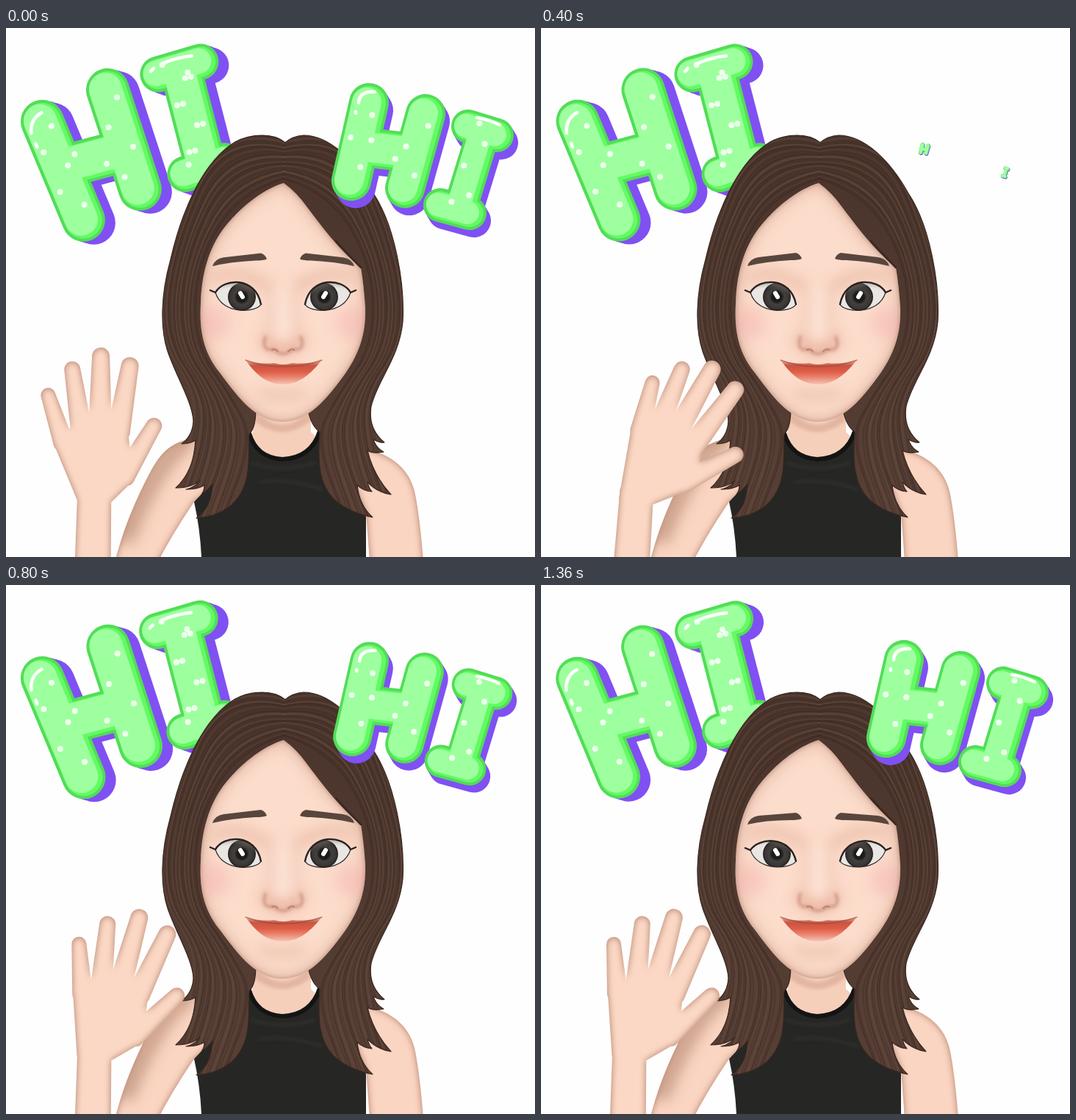
An HTML page that plays this animation: 720 by 720 pixels, repeating every 1440 ms.

```html
<!DOCTYPE html>
<html lang="en">
<head>
<meta charset="utf-8">
<title>Waving hello</title>
<style>
  html, body { margin: 0; height: 100%; overflow: hidden; background: #fefefe; }
  svg { display: block; width: 100vw; height: 100vh; }
</style>
</head>
<body>
<svg viewBox="0 0 720 720" fill="none" stroke-linecap="round" stroke-linejoin="round">
  <defs>
    <filter id="round" color-interpolation-filters="sRGB">
      <feGaussianBlur in="SourceAlpha" stdDeviation="5" result="b"/>
      <feFlood flood-color="#a06a55" flood-opacity=".85"/>
      <feComposite operator="out" in2="b"/>
      <feComposite operator="atop" in2="SourceGraphic"/>
    </filter>
    <filter id="faceRound" color-interpolation-filters="sRGB">
      <feGaussianBlur in="SourceAlpha" stdDeviation="11" result="b"/>
      <feFlood flood-color="#c48b75" flood-opacity=".65"/>
      <feComposite operator="out" in2="b"/>
      <feComposite operator="atop" in2="SourceGraphic"/>
    </filter>
    <filter id="blur2" x="-50%" y="-50%" width="200%" height="200%"><feGaussianBlur stdDeviation="2"/></filter>
    <filter id="blur9" x="-80%" y="-80%" width="260%" height="260%"><feGaussianBlur stdDeviation="9"/></filter>
    <linearGradient id="lips" x2="0" y2="1">
      <stop stop-color="#f0b7a4"/><stop offset=".22" stop-color="#c65643"/>
      <stop offset=".48" stop-color="#e05c45"/><stop offset=".72" stop-color="#e98773"/>
      <stop offset="1" stop-color="#f6c4b2"/>
    </linearGradient>
    <linearGradient id="hairTone" x2="0" y2="1">
      <stop stop-color="#49342b"/><stop offset="1" stop-color="#573f35"/>
    </linearGradient>
    <radialGradient id="iris">
      <stop offset=".35" stop-color="#1d1b1a"/><stop offset=".55" stop-color="#44403d"/>
      <stop offset=".85" stop-color="#393634"/><stop offset="1" stop-color="#1f1d1c"/>
    </radialGradient>
    <clipPath id="hairClip"><use href="#hair"/></clipPath>
    <clipPath id="faceClip"><use href="#face"/></clipPath>
    <clipPath id="armClip"><use href="#upperArm"/></clipPath>
    <clipPath id="eyeClip"><path id="eyeShape"/></clipPath>
    <path id="upperArm" d="M262 557C225 563 212 575 195 607C175 645 156 690 145 740H200Q222 695 256 645L300 610Z"/>
    <path id="hair" d="M380 156C365 143 335 143 312 155C270 180 240 245 224 315C210 365 210 410 220 440C232 475 254 510 255 535Q254 555 239 566Q250 566 258 561C256 590 248 610 231 626Q252 626 264 616Q256 626 245 628Q262 628 270 622Q270 630 266 635Q276 628 281 620C280 645 272 658 259 667C290 665 320 650 328 610C332 590 330 570 331 553C338 545 340 535 340 515V480H411V520C414 535 420 545 427 550C424 590 426 620 445 640C460 655 480 662 499 666C488 656 480 642 478 622Q486 630 498 631Q494 627 492 618Q505 632 524 635C510 620 498 600 492 575Q500 580 514 577Q504 572 500 560Q508 565 515 564C500 552 494 535 497 515C505 480 535 450 540 400C543 350 530 270 500 225C475 180 440 146 405 146Q390 147 380 156Z"/>
    <path id="face" d="M378 211C348 220 318 245 296 273C276 300 266 335 265 375C263 410 268 440 290 468C312 497 338 536 376 536C414 536 440 500 462 470C484 438 490 410 489 380Q487 350 483 326C455 304 428 268 410 244Q396 224 378 211Z"/>
    <g id="eye">
      <g clip-path="url(#eyeClip)">
        <path d="M280 335H350V392H280Z" fill="#e9e6e3"/>
        <circle cx="321" cy="366" r="19" fill="url(#iris)"/>
        <path d="M319 361l3 5" stroke="#fff" stroke-width="6"/>
        <path d="M284 352Q318 338 348 364" stroke="#8a7d77" stroke-width="6" opacity=".45" filter="url(#blur2)"/>
      </g>
      <path class="lower" stroke="#2b2524" stroke-width="1.2"/>
      <path class="lash" stroke="#2a2120" stroke-width="2.4"/>
    </g>
    <path id="brow" fill="#58463d"/>
  </defs>

  <g id="leftWord"></g>

  <g filter="url(#round)" fill="#fad5c1">
    <use href="#upperArm"/>
    <path d="M480 570C530 580 553 605 558 640Q565 680 569 740H496L490 660L470 610Z"/>
  </g>
  <g clip-path="url(#armClip)">
    <path d="M245 562Q205 590 165 690" stroke="#b98d77" stroke-width="24" opacity=".7" filter="url(#blur9)"/>
  </g>
  <path d="M336 490H415V550Q440 570 430 600H325Q315 570 336 550Z" fill="#f6cfbb"/>
  <path d="M338 518Q376 562 414 518V535Q376 565 338 535Z" fill="#cf9c86" opacity=".5" filter="url(#blur2)"/>
  <path d="M331 552C338 572 352 584 376 586C402 585 419 572 427 549Q445 565 462 600Q466 640 490 665V720H266Q264 680 256 645Q300 600 310 570Z" fill="#262724"/>
  <path d="M331 552C338 574 352 585 376 587C402 586 419 574 427 549" stroke="#131413" stroke-width="6"/>
  <path d="M335 592Q376 606 420 592M345 618Q385 612 430 628" stroke="#353632" stroke-width="4" opacity=".6" filter="url(#blur2)"/>

  <use href="#hair" fill="url(#hairTone)"/>
  <g id="strands" clip-path="url(#hairClip)"></g>
  <use href="#hair" stroke="#38261f" stroke-width="1.2"/>

  <use href="#face" fill="#fcdccb" filter="url(#faceRound)"/>
  <g clip-path="url(#faceClip)">
    <g filter="url(#blur9)">
      <ellipse cx="282" cy="402" rx="23" ry="22" fill="#f3a3a5" opacity=".35"/>
      <ellipse cx="472" cy="402" rx="23" ry="22" fill="#f3a3a5" opacity=".35"/>
      <path d="M285 340Q318 325 350 350M469 340Q436 325 404 350" stroke="#dda28b" stroke-width="12" opacity=".55"/>
      <path d="M352 425Q376 452 402 425" stroke="#dd987f" stroke-width="13" opacity=".7"/>
      <path d="M358 345Q368 385 356 418M396 345Q388 385 398 418" stroke="#e5b19b" stroke-width="8" opacity=".55"/>
      <path d="M348 496Q376 506 404 496" stroke="#dca48e" stroke-width="8" opacity=".7"/>
      <path d="M377 360V415" stroke="#ffebdf" stroke-width="9"/>
    </g>
    <use href="#face" stroke="#7e5646" stroke-width="2" opacity=".5" filter="url(#blur2)"/>
  </g>
  <path d="M353 420Q348 436 358 438Q365 436 369 441Q377 446 385 441Q390 436 397 438Q407 435 401 420" stroke="#bd806c" stroke-width="2.5" filter="url(#blur2)"/>
  <path d="M362 438q5-2 8 2M384 440q4-4 8-2" stroke="#a76654" stroke-width="2" opacity=".6"/>
  <path d="M326 452Q345 458 365 456Q377 460 390 456Q410 458 430 452C415 470 400 485 377 485C352 485 338 468 326 452Z" fill="url(#lips)"/>
  <path d="M326 452Q350 461 377 461Q405 461 430 452" stroke="#9c4435" stroke-width="1.4" opacity=".6"/>
  <use href="#eye"/><use href="#eye" transform="matrix(-1 0 0 1 754 0)"/>
  <use href="#brow"/><use href="#brow" transform="matrix(-1 0 0 1 755 0)"/>
  <path d="M449 290Q466 309 483 326" stroke="#3a2821" stroke-width="2.5"/>

  <g id="rightWord"></g>
  <g id="hand" filter="url(#round)" fill="#fbd8c5" stroke="#fbd8c5"></g>
</svg>

<script>
const LOOP = 1440, STEP = 80, TAU = 2 * Math.PI;
const $ = id => document.getElementById(id);
const mix = (a, b, t) => a + (b - a) * t;
const mixPoint = (a, b, t) => a.map((v, i) => mix(v, b[i], t));
const polar = ([x, y], degrees, length) => {
  const a = degrees * TAU / 360;
  return [x + length * Math.sin(a), y - length * Math.cos(a)];
};

// Bubble letter from thick bars, with dots zigzagging along each bar
function letter(word, { bars, width, shadow: [sx, sy], shine, center: [cx, cy] }) {
  const d = bars.map(([x1, y1, x2, y2]) => `M${x1} ${y1}L${x2} ${y2}`).join('');
  const layer = (color, w, x = 0, y = 0) =>
    `<path d="${d}" stroke="${color}" stroke-width="${w}" transform="translate(${x} ${y})"/>`;
  const dots = bars.map(([x1, y1, x2, y2]) => {
    const length = Math.hypot(x2 - x1, y2 - y1), count = Math.round(length / 32);
    return Array.from({ length: count }, (_, i) => {
      const t = (i + .4) / count, side = (i % 2 ? -.2 : .2) * width / length;
      return `<circle cx="${mix(x1, x2, t) + (y2 - y1) * side - 3}" cy="${mix(y1, y2, t) - (x2 - x1) * side}" r="4" fill="#efffee"/>`;
    }).join('');
  }).join('');
  const g = document.createElementNS('http://www.w3.org/2000/svg', 'g');
  g.innerHTML = layer('#8050f3', width, sx / 2, sy / 2) + layer('#8050f3', width, sx, sy) +
    layer('#53dc58', width) + layer('#62fb62', width - 8) + layer('#9eff9f', width - 14, -3, -1) +
    dots + `<path d="${shine}" stroke="#fff" stroke-width="4.5"/>`;
  word.append(g);
  return (scale, dx = 0, dy = 0) => g.setAttribute('transform',
    `translate(${cx + dx} ${cy + dy}) scale(${scale}) translate(${-cx} ${-cy})`);
}

const leftH = letter($('leftWord'), {
  bars: [[50, 127, 106, 261], [139, 84, 183, 219], [85, 187, 160, 167]],
  width: 59, shadow: [14, 4], center: [123, 174], shine: 'M35 143Q33 124 49 115M41 157l2 5'
});
const leftI = letter($('leftWord'), {
  bars: [[206, 63, 264, 46], [233, 58, 266, 186], [241, 56, 274, 184], [243, 199, 297, 181]],
  width: 49, shadow: [14, 5], center: [247, 122], shine: 'M213 48Q232 40 252 38M196 59l4-4'
});
const rightH = letter($('rightWord'), {
  bars: [[494, 102, 470, 208], [571, 117, 543, 218], [485, 162, 555, 170]],
  width: 54, shadow: [6, 10], center: [522, 165], shine: 'M480 102Q481 86 502 87M476 114v2'
});
const rightI = letter($('rightWord'), {
  bars: [[629, 134, 668, 146], [650, 141, 618, 246], [591, 241, 631, 252]],
  width: 46, shadow: [6, 10], center: [632, 197], shine: 'M641 122Q658 125 672 132'
});

// Hair strands blend from the outer edge to the inner edge, mirrored for the right side
const outerEdge = [[379, 156], [290, 130], [222, 300], [208, 420], [262, 500], [252, 570], [225, 650]];
const innerEdge = [[379, 208], [320, 230], [262, 320], [258, 430], [310, 505], [340, 560], [295, 680]];
const curve = p => `M${p[0]}` + p.slice(1, -1).map((q, i) => `Q${q} ${mixPoint(q, p[i + 2], .5)}`).join('') + `L${p.at(-1)}`;
const strandCount = 24;
let strands = '';
for (let i = 0; i < strandCount; i++) {
  const d = curve(outerEdge.map((p, j) => mixPoint(p, innerEdge[j], (i + .5 * Math.sin(i * 7 + j)) / strandCount)));
  const light = i % 3 === 0;
  strands += `<path d="${d}" stroke="${light ? '#654b3f' : '#38261f'}" stroke-width="${light ? 3 : 1.5}"
    opacity="${.4 + .2 * Math.sin(i * 5)}"/>`;
}
$('strands').innerHTML = strands + `<g transform="matrix(-1 0 0 1 757 0)">${strands}</g>`;

// Turns of the wave completed: even at first, one quick shake in the middle, then even again
const waveKeys = [[0, 0], [400, .71], [640, 1.29], [880, 2.14], [1120, 2.43], [LOOP, 3]];
function waveTurn(t) {
  const i = waveKeys.findIndex(([end]) => end > t);
  const [t0, a] = waveKeys[i - 1], [t1, b] = waveKeys[i];
  return mix(a, b, (t - t0) / (t1 - t0));
}

const fingers = [[68, 20], [86, 22], [98, 24], [91, 24]]; // length, thickness

function drawHand(turn) {
  const swing = peak => Math.cos(TAU * (turn - peak));
  const palmX = 146 - 36 * swing(.09);
  const wristX = 133 - 14 * swing(.93), elbowX = 122 - 5 * swing(.93);
  const lean = -4 + 30 * Math.max(0, swing(.73)) ** 2;
  const spread = 19 - 11 * swing(.4);
  const shape = (points, w) => `<path d="M${points.join('L')}Z" stroke-width="${w}"/>`;
  const digit = (base, angle, length, w) =>
    shape([polar(base, angle, length), polar(base, angle + 90, 4), polar(base, angle - 90, 4)], w);

  const bases = fingers.map((_, i) => {
    const s = i / 3 - .5;
    const [x, y] = polar([palmX, 557], lean * .8 + 82, 76 * s);
    return [x, y - 11 * (1 - 4 * s * s)];
  });
  const [x, y] = mixPoint(bases[3], [wristX, 639], .5);
  const thumb = [x + 24, y + 16];
  $('hand').innerHTML =
    fingers.map(([length, w], i) => digit(bases[i], lean + spread * (i / 3 - .5), length, w)).join('') +
    digit(thumb, 46 - 20 * swing(.11), 80, 22) +
    shape([...bases, thumb, [wristX + 11, 639], [wristX - 11, 639]], 26) +
    shape([[wristX - 17, 629], [wristX + 17, 629], [elbowX + 19, 760], [elbowX - 19, 760]], 12);
}

function drawEyes(lid) {
  const outer = 360 + 12 * lid, inner = 376 - 2 * lid;
  const upper = `M285 ${outer}C296 ${340 + 38 * lid} 340 ${338 + 41 * lid} 347 ${inner}`;
  const lower = `C342 ${387 - 8 * lid} 295 ${392 - 14 * lid} 285 ${outer}`;
  const brow = Math.sqrt(lid), out = 7 * brow, inn = 14 * brow;
  $('eyeShape').setAttribute('d', upper + lower);
  document.querySelector('.lash').setAttribute('d', `M278 ${outer - 3 + lid}L285 ${outer}` + upper);
  document.querySelector('.lower').setAttribute('d', `M347 ${inner}` + lower);
  $('brow').setAttribute('d', `M281 ${324 + out}Q284 ${314 + out} 296 ${312 + out}L347 ${306 + inn}
    Q353 ${308 + inn} 355 ${314 + inn}Q350 ${316 + inn} 340 ${316 + inn}Q305 ${318 + out} 281 ${324 + out}Z`);
}

// Grow quickly, then wobble around full size
function pop(t) {
  if (t < 0) return 0;
  const rest = t - 160;
  return rest < 0 ? mix(.1, 1, t / 160) : 1 + .12 * Math.exp(-rest / 200) * Math.sin(rest / 60);
}

function draw(t) {
  const settled = t || LOOP; // the loop opens on the settled words
  const left = pop(settled - 240), right = pop(settled - 400);
  const apart = Math.sqrt(Math.max(0, 1 - left));
  leftH(left, -23 * apart, 10 * apart);
  leftI(left, 34 * apart, -4 * apart);
  rightH(right);
  rightI(right);
  drawHand(waveTurn(t));
  drawEyes(Math.exp(-((Math.abs(settled - 1155) / 150) ** 3)));
}

let shown = -1;
function frame() {
  const t = Math.floor(performance.now() % LOOP / STEP) * STEP;
  if (t !== shown) draw(shown = t);
  requestAnimationFrame(frame);
}
frame();
</script>
</body>
</html>
```
